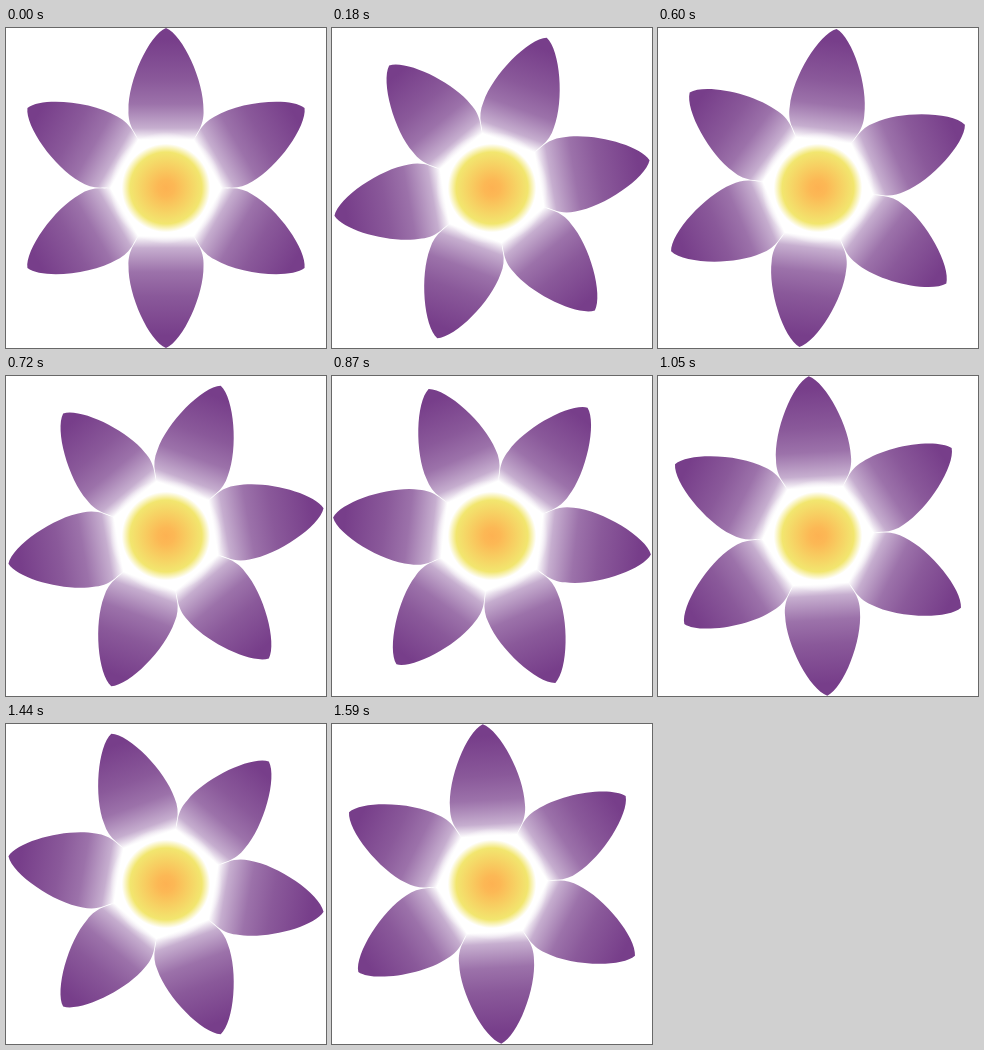
These frames come from a looping animation (320x320 px, 1620 ms). An HTML page:

```html
<!DOCTYPE html>
<html lang="en">
<head>
<meta charset="utf-8">
<title>Turning flower</title>
<style>
  html, body { margin: 0; width: 100%; height: 100%; overflow: hidden; background: #fff; }
  svg { display: block; width: 100vw; height: 100vh; }
</style>
</head>
<body>
<svg viewBox="-160 -160 320 320">
  <defs>
    <linearGradient id="violet" gradientUnits="userSpaceOnUse" x1="0" y1="-148" x2="0" y2="-48">
      <stop offset="0" stop-color="#773e8a"/>
      <stop offset=".4" stop-color="#8a599a"/>
      <stop offset=".64" stop-color="#9c72aa"/>
      <stop offset=".88" stop-color="#c6aecf"/>
      <stop offset="1" stop-color="#fff"/>
    </linearGradient>
    <radialGradient id="sun" gradientUnits="userSpaceOnUse" cx="0" cy="0" r="56">
      <stop offset="0" stop-color="#fdb252"/>
      <stop offset=".15" stop-color="#fcb855"/>
      <stop offset=".64" stop-color="#f2e66f"/>
      <stop offset=".79" stop-color="#fff"/>
      <stop offset="1" stop-color="#fff" stop-opacity="0"/>
    </radialGradient>
    <path id="petal" fill="url(#violet)" d="M0-160
      C17-153 38-107 37.5-78 C38-70 36-63 32.5-57 C29-51 27-49 28-40
      H-28 C-27-49-29-51-32.5-57 C-36-63-38-70-37.5-78 C-38-107-17-153 0-160Z"/>
  </defs>
  <g id="flower">
    <use href="#petal"/>
    <use href="#petal" transform="rotate(60)"/>
    <use href="#petal" transform="rotate(120)"/>
    <use href="#petal" transform="rotate(180)"/>
    <use href="#petal" transform="rotate(240)"/>
    <use href="#petal" transform="rotate(300)"/>
  </g>
  <circle r="56" fill="url(#sun)"/>
</svg>
<script>
  const STEP = 30, STEPS_PER_PETAL = 18;
  const flower = document.getElementById("flower");
  const start = performance.now();

  function draw() {
    const step = Math.floor((performance.now() - start) / STEP) % STEPS_PER_PETAL;
    flower.setAttribute("transform", `rotate(${step * 60 / STEPS_PER_PETAL})`);
    requestAnimationFrame(draw);
  }
  draw();
</script>
</body>
</html>
```
